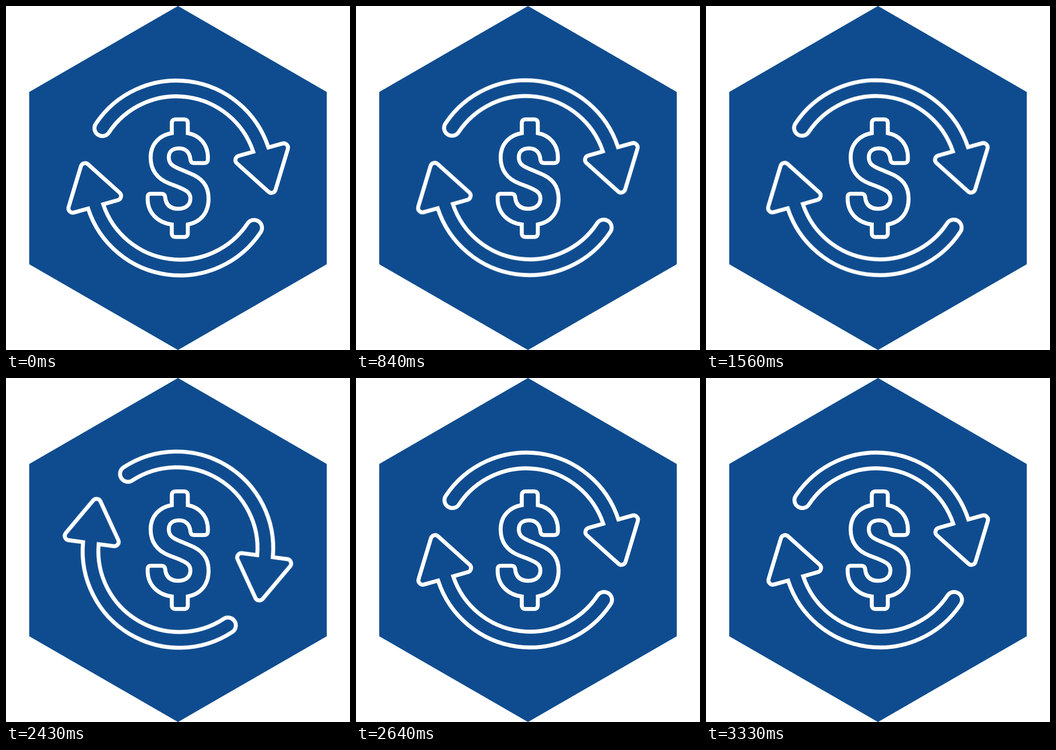
Recreate the animation shown at these times as an HTML page. Size 748 px wide and 748 px high, loop 3600 ms.

```html
<!DOCTYPE html>
<html lang="en">
<head>
<meta charset="utf-8">
<title>Money cycle</title>
<style>
  html, body { margin: 0; width: 100%; height: 100%; overflow: hidden; background: #fff; }
  svg { display: block; width: 100%; height: 100%; }
  .line { fill: none; stroke: #fff; stroke-width: 8.6; }

  .arrows { transform-origin: 374.1px 373.7px; animation: turn 3600ms linear infinite; }
  .dollar { transform-origin: 374.5px 374.5px; animation: pulse 3600ms linear infinite; }

  /* Stops sit a hair early so that each 30 ms step lands on time. */
  @keyframes turn {
    0% { transform: rotate(0deg); }
    16.666% { transform: rotate(0deg); animation-timing-function: steps(8); }
    23.333%, 66.666% { transform: rotate(180deg); }
    66.666% { animation-timing-function: steps(8); }
    73.333%, 100% { transform: rotate(360deg); }
  }
  @keyframes pulse {
    0% { transform: scale(1); }
    34.166%, 83.333% { transform: scale(1); animation-timing-function: steps(6); }
    39.166%, 88.333% { transform: scale(1.2); animation-timing-function: steps(5); }
    43.333%, 92.499% { transform: scale(1); animation-timing-function: linear; }
    100% { transform: scale(1); }
  }
</style>
</head>
<body>
<svg viewBox="0 0 748 748">
  <defs>
    <clipPath id="crop"><rect x="130" y="150" width="487.4" height="440.4"/></clipPath>
    <path id="arrow" d="M195.1 256.4 A210.3 210.3 0 0 1 570.5 307.6
      L601.1 299 A9.5 9.5 0 0 1 612.8 310.9
      L586.1 399.4 A9.5 9.5 0 0 1 570.6 403.8
      L502 342.1 A9.5 9.5 0 0 1 505.7 325.9
      L537.6 316.9 A176.2 176.2 0 0 0 223.6 275.3
      A17.1 17.1 0 0 1 195.1 256.4Z"/>
  </defs>
  <path fill="#0f4c8f" d="M374 0 L697.5 187 V561.5 L374 748 L50.5 561.5 V187Z"/>
  <g class="line arrows">
    <g clip-path="url(#crop)">
      <use href="#arrow"/>
      <use href="#arrow" transform="rotate(180 374.5 374)"/>
    </g>
  </g>
  <path class="line dollar" d="M360.5 276.5 V255 Q360.5 246.5 369 246.5 H387 Q395.3 246.5 395.3 255 V276.5
    C421 281 439 301 439 329 V333 Q439 341.5 431 341.5 H409 Q402 341.5 401 334
    C399.5 318 391 309.5 376 309.5 C362 309.5 354 317 354 329
    C354 342 361 348 379 355 L398 363 C427 374 440.5 391 440.5 419
    C440.5 450 423 470 395.3 475 V494 Q395.3 502.3 387 502.3 H369 Q360.5 502.3 360.5 494 V475
    C329 471 308 449 308 419 V416 Q308 408.3 315 408.3 H338 Q345 408.3 346 415
    C347.5 432 357 441 375 441 C391 441 401 432 401 418.5
    C401 405 391 400 371 392 L355 386 C327 375 314.5 356 314.5 329
    C314.5 301 333 281 360.5 276.5Z"/>
</svg>
</body>
</html>
```
